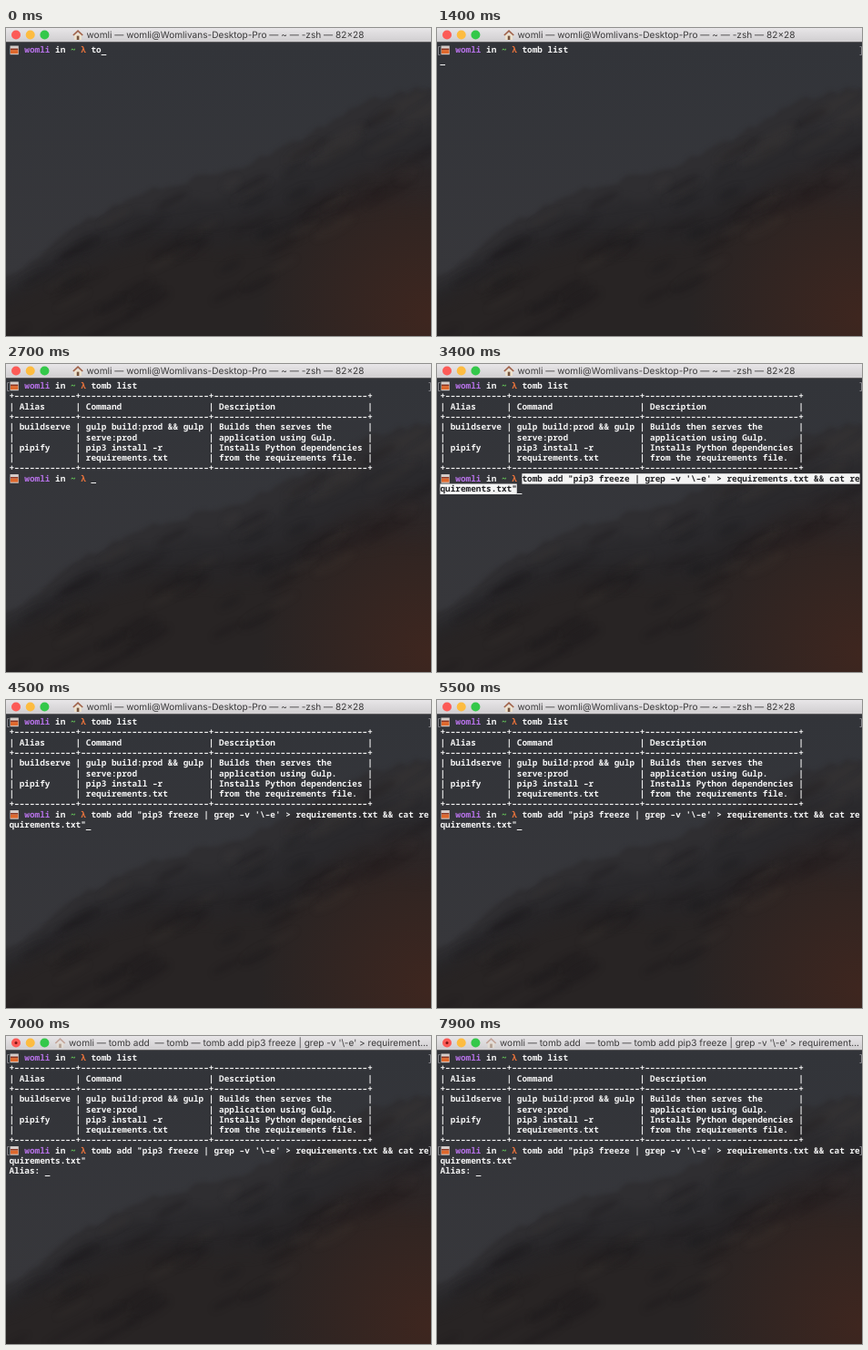
These frames come from a looping animation (467x338 px, 8000 ms). An HTML page with a canvas:

```html
<!DOCTYPE html>
<html lang="en">
<head>
<meta charset="utf-8">
<title>Terminal</title>
<style>
  html, body { margin: 0; width: 100%; height: 100%; overflow: hidden; background: #2b2b2e; }
  canvas { display: block; }
</style>
</head>
<body>
<canvas id="stage" width="467" height="338"></canvas>
<script>
const W = 467, H = 338, BAR = 15, LOOP = 8000;
const LEFT = 3.4, CELL = 5.625, TOP = 18.7, LINE = 11.28;
const MONO = '600 9.375px "Noto Sans Mono", "DejaVu Sans Mono", monospace';
const TITLE_FONT = '10.1px Inter, "Open Sans", sans-serif';
const WHITE = '#f4f4f4';

const USER = 'womli';
const SHELL_TITLE = `${USER} — ${USER}@Womlivans-Desktop-Pro — ~ — `;
const LIST = 'tomb list';
const ADD = `tomb add "pip3 freeze | grep -v '\\-e' > requirements.txt && cat requirements.txt"`;
const ADD_TITLE = `${USER} — tomb add  — tomb — tomb add pip3 freeze | grep -v '\\-e' > requirement...`;

// Times in ms
const T = { listEnter: 1400, listTitle: 1500, table: 1700, listDone: 2000,
            paste: 3200, settle: 4200, addEnter: 6600, addTitle: 6800, ask: 7000 };

const COLUMNS = [10, 23, 28];
const rule = '+' + COLUMNS.map(n => '-'.repeat(n + 2)).join('+') + '+';
const tableRow = (...cells) => '| ' + cells.map((c, i) => c.padEnd(COLUMNS[i])).join(' | ') + ' |';
const TABLE = [
  rule,
  tableRow('Alias', 'Command', 'Description'),
  rule,
  tableRow('buildserve', 'gulp build:prod && gulp', 'Builds then serves the'),
  tableRow('', 'serve:prod', 'application using Gulp.'),
  tableRow('pipify', 'pip3 install -r', 'Installs Python dependencies'),
  tableRow('', 'requirements.txt', 'from the requirements file.'),
  rule
];

const ctx = document.getElementById('stage').getContext('2d');
ctx.textRendering = 'geometricPrecision';

function randomizer(seed) {
  return () => (seed = seed * 16807 % 2147483647) / 2147483647;
}

function rect(color, x, y, w, h) {
  ctx.fillStyle = color;
  ctx.fillRect(x, y, w, h);
}

function verticalGradient(c, y0, y1, from, to) {
  const g = c.createLinearGradient(0, y0, 0, y1);
  g.addColorStop(0, from);
  g.addColorStop(1, to);
  return g;
}

const ridge = x => 272 - 207 * (x / W) ** 0.8 - 9 * Math.sin((x - 55) / 45);

function makeWallpaper() {
  const canvas = document.createElement('canvas');
  canvas.width = W;
  canvas.height = H;
  const c = canvas.getContext('2d');
  const random = randomizer(71);
  c.fillStyle = verticalGradient(c, BAR, 270, '#323439', '#37373b');
  c.fillRect(0, 0, W, H);

  // Each nearer slope is darker, warmer and softer
  ['#2f2e31', '#2a292c', '#272527', '#282424'].forEach((color, depth) => {
    c.filter = `blur(${2 + depth * 2}px)`;
    c.fillStyle = color;
    c.beginPath();
    c.moveTo(-20, H + 20);
    for (let x = 0; x <= W + 20; x += 9)
      c.lineTo(x - (x ? 0 : 20), ridge(x) + depth * (10 + x / 14) + (random() - 0.5) * 9);
    c.lineTo(W + 20, H + 20);
    c.fill();
  });

  // Rock streaks running up the slope
  c.filter = 'blur(3px)';
  for (let i = 0; i < 60; i++) {
    const x = random() * W, y = ridge(x) + 15 + random() * 130;
    c.fillStyle = i % 3 ? 'rgba(24,22,25,.3)' : 'rgba(66,60,58,.2)';
    c.beginPath();
    c.ellipse(x, y, 10 + random() * 25, 2 + random() * 5, -0.5, 0, 7);
    c.fill();
  }

  c.filter = 'none';
  const glow = c.createRadialGradient(W, H - 20, 0, W, H - 20, 190);
  glow.addColorStop(0, 'rgba(84,40,26,.5)');
  glow.addColorStop(1, 'rgba(84,40,26,0)');
  c.fillStyle = glow;
  c.fillRect(0, 0, W, H);
  return canvas;
}
const wallpaper = makeWallpaper();

// Hyphens are drawn as wide dashes
function write(text, col, row, color = WHITE) {
  ctx.font = MONO;
  ctx.fillStyle = color;
  [...text.replaceAll('-', '–')].forEach((ch, i) =>
    ctx.fillText(ch, LEFT + (col + i) * CELL, TOP + row * LINE + 8.5));
}

function cursor(col, row) {
  rect(WHITE, LEFT + col * CELL, Math.round(TOP + row * LINE + 10), CELL, 1);
}

function glass(row) {
  const y = TOP + row * LINE;
  rect('#d5cdca', 4.5, y + 0.8, 9.3, 9.7);
  rect('#8e3420', 5, y + 3.8, 8.3, 1.6);
  rect('#df692d', 5, y + 5.4, 8.3, 4);
}

function prompt(row, entered) {
  glass(row);
  write(USER, 3, row, '#b571e6');
  write('in', 9, row);
  write('~', 12, row, '#6fe35f');
  write('λ', 14, row, '#e8733c');
  if (!entered) return;
  const y = Math.round(TOP + row * LINE) + 1.5;
  ctx.strokeStyle = '#85858a';
  ctx.lineWidth = 1;
  ctx.beginPath();
  for (const [edge, tip] of [[1.5, 3.5], [W - 0.5, W - 2.5]]) {
    ctx.moveTo(tip, y);
    ctx.lineTo(edge, y);
    ctx.lineTo(edge, y + 9);
    ctx.lineTo(tip, y + 9);
  }
  ctx.stroke();
}

function house(x) {
  rect('#efe3ce', x + 1.6, 6.5, 7.8, 6.5);
  rect('#76543f', x + 4.2, 8.6, 2.6, 4.4);
  ctx.strokeStyle = '#a0624a';
  ctx.lineWidth = 1.7;
  ctx.beginPath();
  ctx.moveTo(x + 0.3, 8);
  ctx.lineTo(x + 5.5, 3.2);
  ctx.lineTo(x + 10.7, 8);
  ctx.stroke();
}

function dot(color, x, radius) {
  ctx.fillStyle = color;
  ctx.beginPath();
  ctx.arc(x, 7.5, radius, 0, 7);
  ctx.fill();
}

function titleBar(t) {
  const listing = t >= T.listTitle && t < T.listDone;
  const adding = t >= T.addTitle;
  const busy = listing || adding;

  rect(verticalGradient(ctx, 0, BAR, '#e8e6e8', '#d0ced0'), 0, 0, W, BAR);
  rect('#5a595b', 0, BAR, W, 1);
  ['#fc5b57', '#fdbc40', '#34c84a'].forEach((color, i) => dot(color, 11 + i * 15.7, 5));
  if (busy) dot('#7d1512', 11, 1.5);

  const title = adding ? ADD_TITLE : `${SHELL_TITLE}${listing ? LIST : '-zsh'} — 82×28`;
  ctx.font = TITLE_FONT;
  const x = Math.max(54, (W - ctx.measureText(title).width - 15) / 2);
  ctx.globalAlpha = busy ? 0.45 : 1;
  house(x);
  ctx.globalAlpha = 1;
  ctx.fillStyle = '#3b3a3b';
  ctx.fillText(title, x + 15, 11.3);
}

function addCommand(t) {
  const lines = [ADD.slice(0, 66), ADD.slice(66)];
  const pasted = t < T.settle;
  lines.forEach((line, i) => {
    const col = i ? 0 : 16, row = 9 + i;
    if (pasted) rect(WHITE, LEFT + col * CELL, TOP + row * LINE, line.length * CELL, LINE + 0.2);
    write(line, col, row, pasted ? '#202023' : WHITE);
  });
  if (t < T.addEnter) cursor(lines[1].length, 10);
}

function draw(t) {
  ctx.drawImage(wallpaper, 0, 0);
  titleBar(t);

  const typed = LIST.slice(0, 2 + Math.floor(t / 100));
  prompt(0, t >= T.listEnter);
  write(typed, 16, 0);
  if (t < T.listEnter) return cursor(16 + typed.length, 0);
  if (t < T.table) return cursor(0, 1);

  TABLE.forEach((line, i) => write(line, 0, i + 1));
  prompt(9, t >= T.addEnter);
  if (t < T.paste) return cursor(16, 9);
  addCommand(t);
  if (t < T.addEnter) return;
  if (t < T.ask) return cursor(0, 11);
  write('Alias:', 0, 11);
  cursor(7, 11);
}

function frame() {
  draw(performance.now() % LOOP);
  requestAnimationFrame(frame);
}
frame();
</script>
</body>
</html>
```
